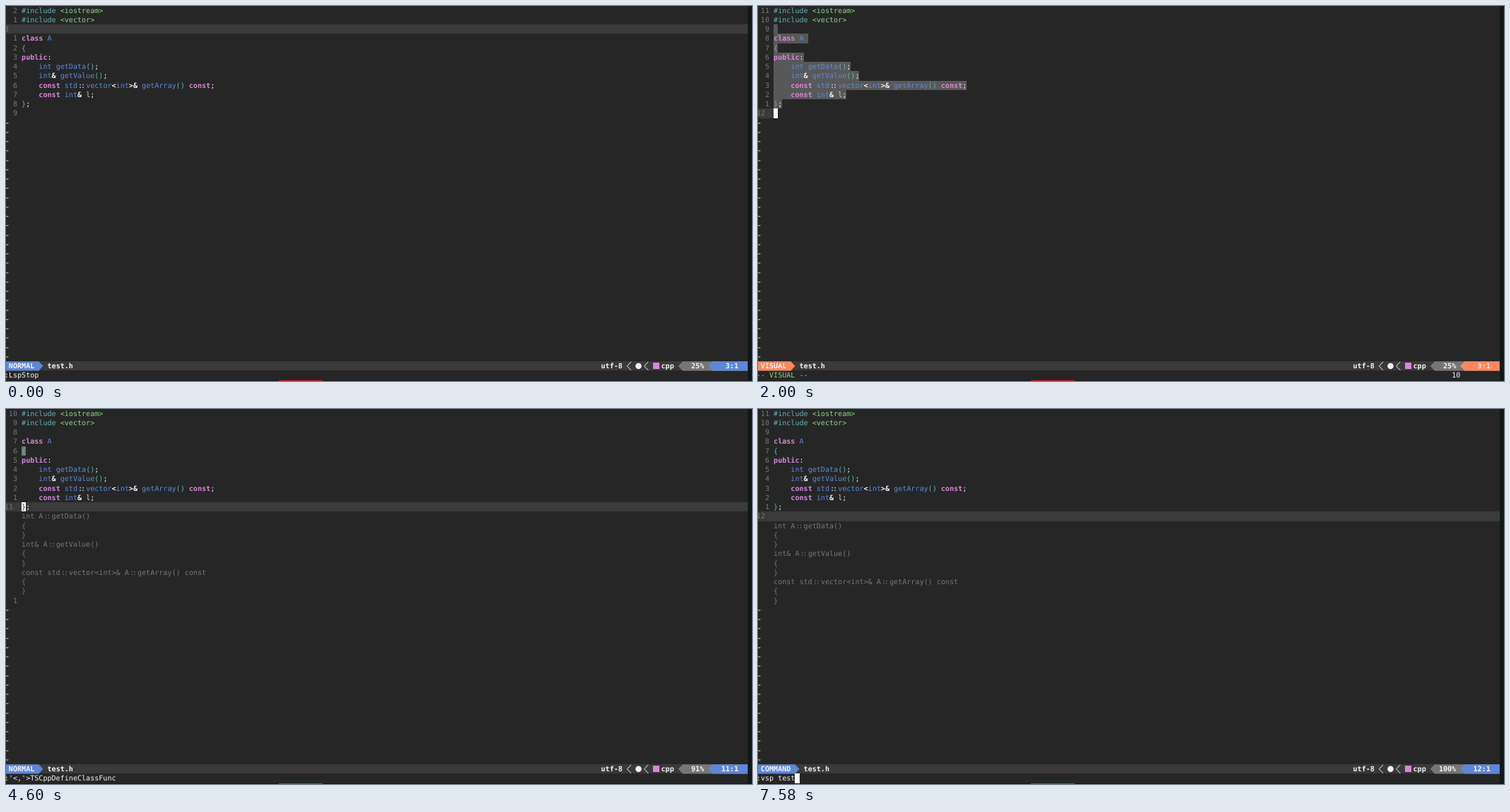
An HTML page for the animation above (8 s loop, 1055 px wide and 531 px high).

```html
<!DOCTYPE html>
<html lang="en">
<head>
<meta charset="utf-8">
<title>Editor session</title>
<style>
  html, body { margin: 0; width: 100%; height: 100%; overflow: hidden; background: #262626; }
  svg { display: block; width: 1055px; height: 531px; }
  text {
    font: 10.08px "DejaVu Sans Mono", monospace;
    text-rendering: geometricPrecision;
    white-space: pre;
  }
  .bold { font-weight: bold; }
</style>
</head>
<body>
<svg id="stage" viewBox="0 0 1055 531"></svg>
<script>
const LOOP = 8000;
const CW = 6.07, RH = 13.25, LEFT = -2.2, TOP = -0.3, EDGE = 1048.8;
const BG = '#262626', BAR = '#3a3a3a', GREY = '#767676', SEL = '#585858';
const BLUE = '#5f87d7', ORANGE = '#ff875f', WHITE = '#f4f4f4', PURPLE = '#d787d7';
const INK = { c: '#5fb3b3', g: '#87d787', p: PURPLE, b: BLUE, w: WHITE, y: '#d7d787' };

// Each token is a colour key followed by its text.
const CODE = [
  'c#include |g<iostream>',
  'c#include |g<vector>',
  '',
  'pclass |bA',
  'c{',
  'ppublic|w:',
  'b    int getData|c()|w;',
  'b    int|w& |bgetValue|c()|w;',
  'p    const |bstd|w::|bvector|w<|bint|w>& |bgetArray|c() |pconst|w;',
  'p    const |bint|w& |yl|w;',
  'c}|w;',
  ''
];
const STUBS = [
  'int A::getData()', '{', '}',
  'int& A::getValue()', '{', '}',
  'const std::vector<int>& A::getArray() const', '{', '}'
];
const MENU = ['TSCppDefineClassFunc', 'TSCppMakeConcreteClass', 'TSCppRuleOf3', 'TSCppRuleOf5'];
const RANGE = ":'<,'>";

// Every step changes only the listed parts of the state.
const STEPS = [
  [0, { mode: 'NORMAL', line: 2, cursor: false, full: true, select: false, stubs: false, menu: false,
        pct: '25%', pos: '3:1', cmd: ':LspStop', typing: false, count: '' }],
  [70, { cursor: true }],
  [1400, { mode: 'VISUAL', full: false }],
  [1470, { cmd: '-- VISUAL --', count: '1' }],
  [1810, { line: 11, select: true, count: '10' }],
  [2200, { mode: 'COMMAND', cursor: false, cmd: RANGE, typing: true, count: '' }],
  [2330, { cmd: RANGE + 'T' }],
  [2530, { cmd: RANGE + 'TS' }],
  [3060, { cmd: RANGE + 'TSC' }],
  [3210, { cmd: RANGE + 'TSCp' }],
  [3340, { cmd: RANGE + 'TSCpp' }],
  [3550, { cmd: RANGE + MENU[0], menu: true }],
  [4600, { mode: 'NORMAL', line: 10, cursor: true, full: true, select: false, stubs: true, menu: false,
           pct: '91%', pos: '11:1', typing: false }],
  [5390, { line: 11 }],
  [5470, { pct: '100%', pos: '12:1' }],
  [6850, { mode: 'COMMAND', cursor: false, cmd: ':', typing: true }],
  [6940, { cmd: ':v' }],
  [7030, { cmd: ':vs' }],
  [7120, { cmd: ':vsp ' }],
  [7310, { cmd: ':vsp t' }],
  [7400, { cmd: ':vsp te' }],
  [7490, { cmd: ':vsp tes' }],
  [7580, { cmd: ':vsp test' }]
];

const stage = document.getElementById('stage');
const colX = c => LEFT + c * CW;
const rowY = r => TOP + r * RH;

function add(tag, attrs, content) {
  const el = document.createElementNS('http://www.w3.org/2000/svg', tag);
  for (const k in attrs) el.setAttribute(k, attrs[k]);
  if (content) el.textContent = content;
  stage.appendChild(el);
}

function box(x, y, width, height, fill) {
  add('rect', { x, y, width, height, fill, 'shape-rendering': 'crispEdges' });
}

const cells = (col, row, n, fill) => box(colX(col), rowY(row), n * CW, RH, fill);
const path = (d, fill, stroke = 'none') => add('path', { d, fill, stroke });

function glyphs(s, x, row, fill, bold) {
  if (s.trim()) add('text', { x, y: rowY(row) + 10, fill, class: bold ? 'bold' : '' }, s);
}

// A double colon is set tighter than its two cells.
function write(s, col, row, fill, bold) {
  for (const part of s.split(/(::)/)) {
    if (part === '::') {
      glyphs(':', colX(col) + 1.1, row, fill, bold);
      glyphs(':', colX(col + 1) - 1.1, row, fill, bold);
    } else {
      const pad = part.length - part.trimStart().length;
      glyphs(part.trim(), colX(col + pad), row, fill, bold);
    }
    col += part.length;
  }
}

function writeCode(line, row) {
  let col = 4;
  for (const token of line.split('|')) {
    const s = token.slice(1);
    write(s, col, row, INK[token[0]], token[0] === 'p' || /[&<>]/.test(s) && token[0] === 'w');
    col += s.length;
  }
}

function codeLength(line) {
  return line.split('|').reduce((n, token) => n + token.slice(1).length, 0);
}

function drawBuffer(s) {
  const shift = i => s.stubs && i > s.line && i > 10 ? STUBS.length : 0;
  const here = rowY(s.line);
  box(0, here, s.full ? EDGE : colX(4), RH, BAR);
  CODE.forEach((line, i) => {
    const row = i + shift(i);
    if (s.select && i > 1 && i < 11) {
      cells(4, row, i === 3 ? 8 : Math.max(1, codeLength(line)), SEL);
    }
    const away = String(Math.abs(i - s.line));
    if (i === s.line) write(String(i + 1), 0, row, GREY);
    else write(away, 3 - away.length, row, GREY);
    if (s.line === 10 && i === 4) cells(4, row, 1, GREY);
    if (line) writeCode(line, row);
  });
  if (s.stubs) STUBS.forEach((line, i) => write(line, 4, s.line + 1 + i, GREY));
  for (let r = s.stubs ? 21 : 12; r < 38; r++) write('~', 0, r, WHITE);
  if (s.cursor) {
    cells(4, s.line, 1, '#ffffff');
    if (s.line === 10) write('}', 4, s.line, BG);
  }
}

function drawStatus(s) {
  const y = rowY(38), mid = y + RH / 2, end = y + RH;
  const tone = s.mode === 'VISUAL' ? ORANGE : BLUE;
  const tip = s.mode.length + 2;
  box(0, y, EDGE, RH, BAR);
  path(`M0 ${y}H${colX(tip)}L${colX(tip + 1)} ${mid}L${colX(tip)} ${end}H0Z`, tone);
  write(s.mode, 1, 38, WHITE, true);
  write('test.h', tip + 2, 38, WHITE, true);

  write('utf-8', 139, 38, WHITE, true);
  for (const c of [145, 149]) {
    path(`M${colX(c + 1)} ${y + 0.6}L${colX(c) + 0.5} ${mid}L${colX(c + 1)} ${end - 0.6}`, 'none', WHITE);
  }
  add('circle', { cx: 894.5, cy: mid, r: 4.3, fill: WHITE });
  box(915, mid - 4.5, 9, 9, PURPLE);
  write('cpp', 153, 38, WHITE, true);

  const wedge = (c, fill) =>
    path(`M${EDGE} ${y}H${colX(c + 1)}L${colX(c)} ${mid}L${colX(c + 1)} ${end}H${EDGE}Z`, fill);
  wedge(157, GREY);
  wedge(164, tone);
  write(s.pct, 163 - s.pct.length, 38, WHITE, true);
  write(s.pos, 171 - s.pos.length, 38, WHITE, true);
}

function drawCommand(s) {
  const visual = s.mode === 'VISUAL' && s.count;
  write(s.cmd, 0, 39, visual ? INK.g : WHITE);
  write(s.count, 162, 39, WHITE);
  if (s.typing) cells(s.cmd.length, 39, 1, '#ffffff');
  if (s.menu) MENU.forEach((item, i) => {
    cells(5, 35 + i, 24, i ? BAR : BLUE);
    write(item, 6, 35 + i, i ? '#bcbcbc' : WHITE);
  });
}

function draw(s) {
  stage.textContent = '';
  box(0, 0, 1055, 531, BG);
  drawBuffer(s);
  drawStatus(s);
  drawCommand(s);
  box(1049, 0, 6, 531, '#12181a');
  box(0, 530, 1055, 1, '#12181a');
  box(386, 530, 62, 1, '#d02020');
}

let shown = -1;
function tick() {
  const t = performance.now() % LOOP;
  const past = STEPS.filter(step => step[0] <= t);
  if (past.length !== shown) {
    shown = past.length;
    draw(Object.assign({}, ...past.map(step => step[1])));
  }
  requestAnimationFrame(tick);
}
tick();
</script>
</body>
</html>
```
